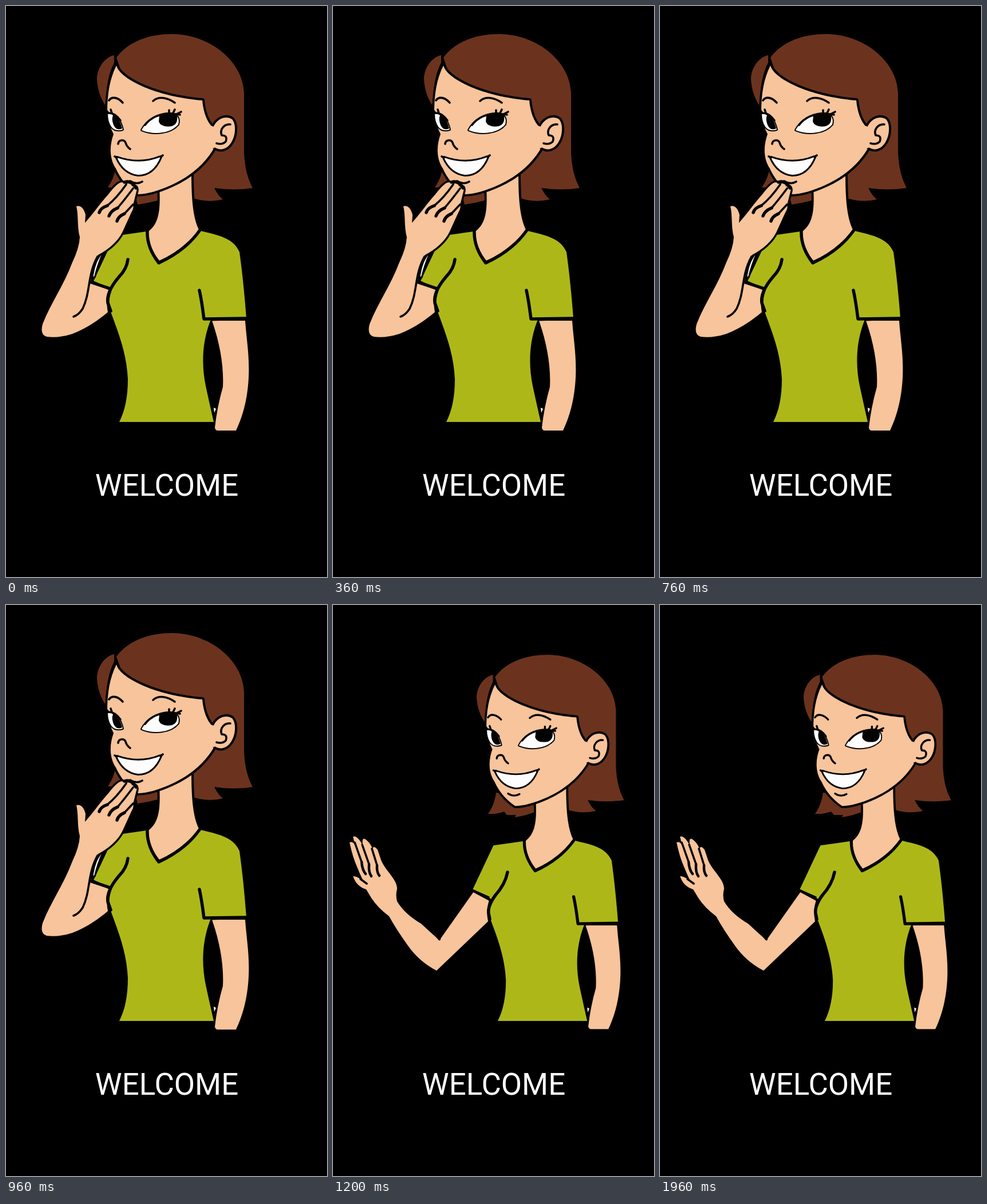
Animation, 561 px wide and 998 px high, one loop 2 s. Source, as an HTML page:

```html
<!DOCTYPE html>
<html lang="en">
<head>
<meta charset="utf-8">
<title>Welcome</title>
<style>
  html, body { margin: 0; width: 100%; height: 100%; overflow: hidden; background: #000; }
  svg { display: block; width: 100vw; height: 100vh; }
  .skin, .hair, .shirt, .white { stroke: #030303; stroke-width: 8; stroke-linejoin: round; paint-order: stroke; }
  .skin { fill: #f8c49b; }
  .hair { fill: #6b331e; }
  .shirt { fill: #adb818; }
  .white { fill: #fdfdfd; stroke-width: 6; }
  .line { fill: none; stroke: #030303; stroke-width: 3.6; stroke-linecap: round; stroke-linejoin: round; }
  .bold { stroke-width: 5.5; }
  .ink { fill: #030303; }
  text { font: 400 52.8px Roboto, Arial, sans-serif; fill: #fff; text-anchor: middle; }
</style>
</head>
<body>
<svg viewBox="0 0 561 998" preserveAspectRatio="none">
  <defs>
    <g id="figure">
      <!-- hair -->
      <path class="hair" d="M193 90C214 62 250 49 291 49C356 50 414 96 416 152L416 255C417 284 423 303 431 318Q399 323 364 318Q370 331 379 338Q350 345 322 334L300 200L210 140Z"/>
      <path class="hair" d="M189 86C169 91 159 112 159 128C160 147 166 163 174 174C175 142 179 118 189 99Z"/>
      <!-- neck -->
      <path class="skin" d="M268 318L324 290C324 334 326 368 337 391Q313 425 268 445Q248 421 249 394C264 382 271 365 268 318Z"/>
      <!-- face and ear -->
      <path class="skin" d="M193 104C198 126 258 158 343 165C345 186 351 202 361 212L365 246C349 275 323 297 291 312C267 323 246 329 230 329C212 317 199 300 192 284C180 266 181 243 188 224C183 213 178 202 177 186C177 154 181 128 193 104Z"/>
      <path class="skin" d="M363 210C371 194 387 192 395 198C403 207 401 227 394 238C387 250 375 254 365 247Z"/>
      <path class="skin" style="stroke:none" d="M357 209L367 212L369 246L358 250Z"/>
      <path class="line" d="M392 207C381 206 373 216 377 226Q388 226 384 237Q378 243 368 240"/>
      <path class="line" d="M180 165C185 157 196 160 204 169M257 166C267 157 282 160 295 169"/>
      <!-- eyes -->
      <path class="white" style="stroke-width:4" d="M178 188C190 186 200 198 204 216Q191 220 184 211Q178 202 178 188Z"/>
      <path class="ink" d="M183 188C194 190 200 201 203 214Q193 219 188 208Q184 198 187 191Z"/>
      <path class="line" d="M178 187Q190 186 200 200M179 187L175 182M185 187L183 181"/>
      <path class="white" style="stroke-width:4" d="M237 217C245 201 264 188 286 188C299 188 304 196 301 207C288 223 258 226 237 217Z"/>
      <path class="ink" d="M268 192Q286 184 299 192Q301 206 290 210Q271 213 267 202Z"/>
      <path class="line" d="M243 208Q258 188 289 188L304 190M285 187L285 182M292 187L295 181M298 189L306 185"/>
      <!-- nose and mouth -->
      <path class="line" d="M196 241C197 233 207 233 209 239Q211 246 217 250"/>
      <path class="white" d="M194 265Q233 279 270 264Q257 295 231 295Q206 292 194 265Z"/>
      <path class="line" d="M190 263L194 265M270 264L274 261M217 306Q228 313 238 307"/>
      <!-- right arm -->
      <path class="skin" style="stroke-width:5" d="M360 550C374 590 381 630 379 666Q369 701 365 737Q366 742 370 742L402 742C413 719 422 689 424 650C426 612 420 581 418 550Z"/>
      <path class="white" style="stroke:none" d="M363 702L367 704L364 711Z"/>
      <!-- shirt -->
      <path class="shirt" style="stroke-width:5" d="M246 394L190 402L152 483L183 497Q176 517 185 540C199 578 211 610 213 652C213 683 208 707 198 727L363 727Q355 692 349 664C341 625 343 585 358 548L420 546C417 506 413 466 408 430C397 404 367 400 340 393Q312 427 267 450Q247 423 246 394Z"/>
      <path class="line bold" d="M247 394Q246 422 267 449Q313 428 338 393M338 497Q342 515 346 547L419 546"/>
    </g>
  </defs>
  <rect width="561" height="998"/>

  <g id="chin">
    <path class="hair" d="M192 280Q190 300 178 317L202 318L214 310ZM226 331L230 347Q250 344 269 339V320Z"/>
    <use href="#figure"/>
    <path class="white" d="M167 434Q154 453 150 472L154 473Q159 452 167 434Z"/>
    <path class="skin" style="stroke-width:7" d="M123 350Q134 347 139 365L138 379C150 366 163 347 179 329Q198 304 205 309L211 311Q218 306 220 315Q230 314 228 324L222 348Q224 353 219 361L203 396Q191 419 161 435Q150 455 148 482L181 497Q174 517 178 535C158 552 137 565 116 573Q91 581 71 578Q59 574 64 556C78 520 101 488 116 448Q128 423 129 404C124 385 127 366 123 350Z"/>
    <path class="line" d="M210 312Q194 335 177 349M222 319Q207 339 195 353M222 347L207 363M160 438C142 470 148 500 134 529Q127 540 118 543"/>
    <path class="line bold" d="M177 349Q165 353 163 361M195 353Q183 358 180 367M207 363Q196 368 194 376M207 308Q219 304 227 318M149 483L182 494"/>
    <path class="line bold" d="M213 443Q211 460 197 474Q175 500 178 519L183 533"/>
  </g>

  <g id="wave">
    <path class="hair" d="M285 328Q282 350 271 365Q286 366 299 361L304 367L320 367L318 371Q338 368 354 361L356 340L300 330Z"/>
    <use href="#figure" transform="matrix(.947 0 0 .944 100.5 40.7)"/>
    <path class="skin" style="stroke-width:5" d="M29 415Q35 412 39 421L35 405Q42 402 52 420Q50 406 56 409Q65 415 69 426Q71 419 78 428L84 446C91 464 112 479 112 496Q109 507 112 518Q125 540 154 557Q169 571 186 586L246 501L273 515Q267 535 271 553L181 639Q150 623 130 594Q110 566 98 544Q78 529 67 512L58 497Q41 492 35 474Q45 474 55 486Q49 475 43 460Q34 440 29 415Z"/>
    <path class="line" d="M38 415L50 449M51 419L63 453M68 426L77 455M48 479L59 487"/>
    <path class="line bold" style="stroke-width:4.5" d="M50 449Q51 463 57 470M63 453Q62 468 67 474M77 455Q76 467 81 473M246 500L274 515M186 584L181 578"/>
    <path class="line bold" d="M305 467Q301 488 284 507Q270 526 272 539L274 549"/>
  </g>

  <text x="281" y="855.5">WELCOME</text>
</svg>
<script>
  const loop = { duration: 2000, iterations: Infinity };
  const play = (id, first, second) =>
    document.getElementById(id).animate([
      { opacity: first, offset: 0, easing: "step-end" },
      { opacity: second, offset: 0.5, easing: "step-end" },
      { opacity: second, offset: 1 }
    ], loop);

  play("chin", 1, 0).startTime = 0;
  play("wave", 0, 1).startTime = 0;
</script>
</body>
</html>
```
